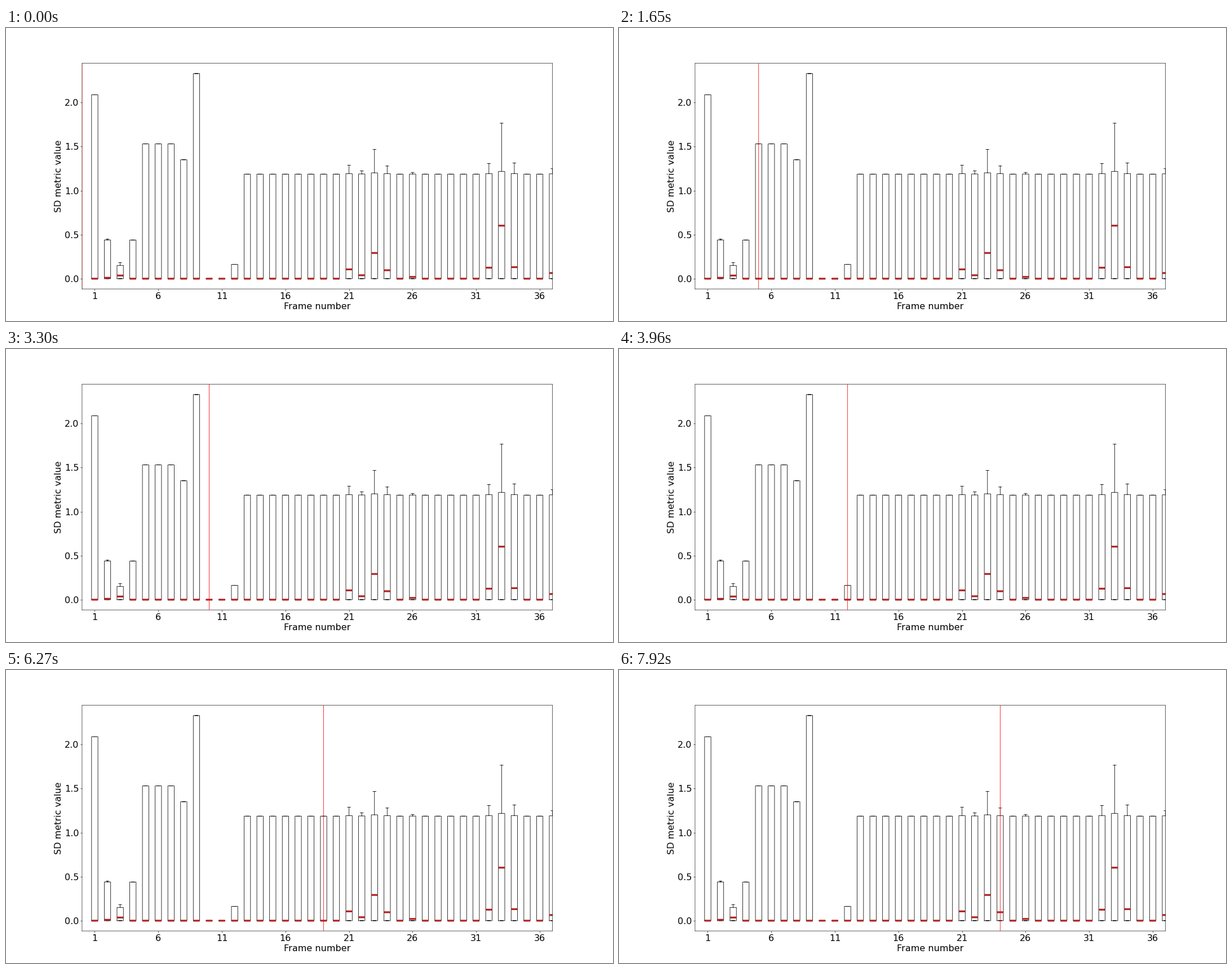
These frames come from a looping animation (1077 by 520 pixels, 8000 ms). A matplotlib script:

```python
import matplotlib.pyplot as plt
import numpy as np
from matplotlib.animation import FuncAnimation

WIDTH, HEIGHT, DPI = 1077, 520, 72
LOOP_MS, TICK_MS, STEP_MS = 8000, 20, 330
BOX_HALF, CAP_HALF = 0.25, 0.125
SCALE = 0.8    # size of default strokes and gaps
NUDGE = 0.3    # pixels right and down

plt.rcParams.update({
    "font.family": "DejaVu Sans", "font.size": 20 * SCALE,
    "path.snap": False, "axes.linewidth": 0.8 * SCALE,
    "axes.labelpad": 4 * SCALE,
})

# Runs of equal box height: (level, count)
runs = [(2.088, 1), (0.439, 1), (0.149, 1), (0.439, 1), (1.53, 3), (1.35, 1),
        (2.328, 1), (0, 2), (0.163, 1), (1.187, 25)]
levels = np.repeat(*np.transpose(runs).tolist()[:1],
                   [count for _, count in runs])
last = len(levels)

# Raised medians; each also lifts its box top and whisker
medians = {2: 0.01, 3: 0.036, 21: 0.106, 22: 0.039, 23: 0.292, 24: 0.096,
           26: 0.02, 32: 0.125, 33: 0.602, 34: 0.131, 37: 0.064}


def draw_strokes(ax, strokes, **style):
    """Draw many polylines as one line with gaps."""
    gap = [(np.nan, np.nan)]
    points = np.array([p for stroke in strokes for p in stroke + gap])
    ax.plot(points[:, 0], points[:, 1], **style)


def level_line(x, y, half):
    return [(x - half, y), (x + half, y)]


def box_outline(x, top):
    left, right = x - BOX_HALF, x + BOX_HALF
    return [(left, 0), (right, 0), (right, top), (left, top), (left, 0)]


fig, ax = plt.subplots(figsize=(WIDTH / DPI, HEIGHT / DPI), dpi=DPI)
dx, dy = NUDGE / WIDTH, NUDGE / HEIGHT
fig.subplots_adjust(left=0.125 + dx, right=0.9 + dx,
                    bottom=0.11 - dy, top=0.88 - dy)

outlines, centres = [], []
for x, level in enumerate(levels, start=1):
    median = medians.get(x, 0)
    top, high = level + 0.05 * median, level + 0.96 * median
    outlines += [box_outline(x, top), [(x, top), (x, high)],
                 level_line(x, 0, CAP_HALF), level_line(x, high, CAP_HALF)]
    centres.append(level_line(x, median, BOX_HALF))

draw_strokes(ax, outlines, color="black", lw=SCALE)
draw_strokes(ax, centres, color="firebrick", lw=4 * SCALE,
             solid_capstyle="butt")
cursor = ax.axvline(0, color="red", lw=SCALE, zorder=3)

peak = levels.max()
ax.set_xlim(0, last)
ax.set_ylim(-0.05 * peak, 1.05 * peak)
ax.set_xticks(range(1, last, 5))
ax.set_yticks(np.arange(0, 2.1, 0.5))
ax.tick_params(length=3.5 * SCALE, pad=3.5 * SCALE, width=0.8 * SCALE)
ax.set_xlabel("Frame number")
ax.set_ylabel("SD metric value")


def update(i):
    # Sample mid-tick so each jump lands on the nearest tick
    position = (i * TICK_MS + TICK_MS // 2) // STEP_MS
    cursor.set_xdata([position, position])
    return (cursor,)


anim = FuncAnimation(fig, update, frames=LOOP_MS // TICK_MS,
                     interval=TICK_MS, repeat=True, repeat_delay=0)
plt.show()
```
